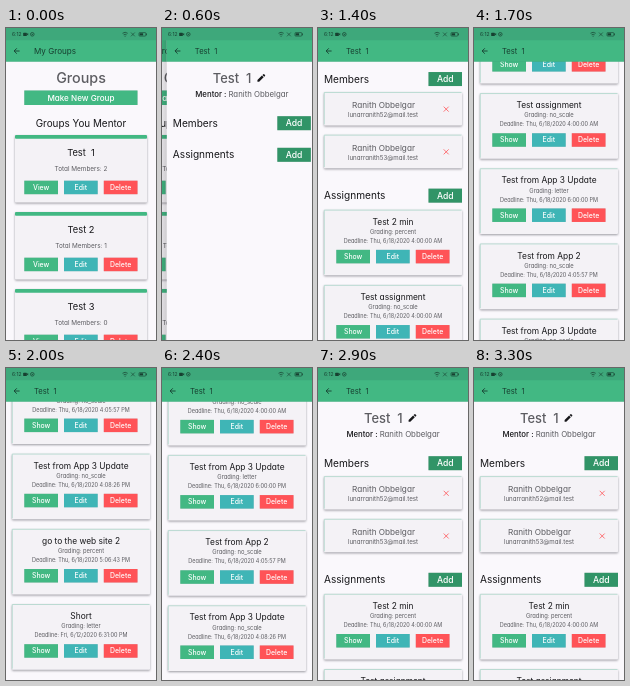
An HTML page for the animation above (3.6 s loop, 150 by 312 pixels).

```html
<!DOCTYPE html>
<html lang="en">
<head>
<meta charset="utf-8">
<title>Groups</title>
<style>
  html, body { margin: 0; width: 100%; height: 100%; overflow: hidden; background: #faf8fc; }
  svg { display: block; width: 100vw; height: 100vh; }
  text {
    font-family: Inter, "Open Sans", sans-serif;
    font-feature-settings: "cv11";
    white-space: pre;
  }
  .card { filter: drop-shadow(0 1px 1px rgba(40, 40, 50, .45)); }
  .btn { filter: drop-shadow(0 .4px .5px rgba(40, 40, 50, .2)); }
</style>
</head>
<body>
<svg id="stage" viewBox="0 0 150 312" preserveAspectRatio="none">
  <defs>
    <linearGradient id="edge">
      <stop offset="0" stop-opacity="0"/>
      <stop offset="1" stop-opacity=".16"/>
    </linearGradient>
  </defs>
</svg>
<script>
const LOOP = 3600, STEP = 100, W = 150, H = 312;
const GREEN = '#42b883', DEEP = '#319467', TEAL = '#3fb5b6', RED = '#ff5357';
const BG = '#faf8fc', CARD = '#f4f2f6', INK = '#17171a', GREY = '#5c5c61', BAR_INK = '#173f30';
const PERSON = 'Ranith Obbelgar';
const NB = '\u00a0';
const TITLE = 'Test' + NB + NB + '1';

const rect = (x, y, w, h, fill, more = '') =>
  `<rect x="${x}" y="${y}" width="${w}" height="${h}" fill="${fill}" ${more}/>`;

const text = (str, x, y, size, fill, weight = 400, anchor = 'middle') =>
  `<text x="${x}" y="${y}" font-size="${size}" fill="${fill}" font-weight="${weight}" text-anchor="${anchor}">${str}</text>`;

const line = (d, color, width) =>
  `<path d="${d}" fill="none" stroke="${color}" stroke-width="${width}"/>`;

const group = (id, body) => `<g id="${id}">${body}</g>`;

const button = (label, x, y, w, h, fill, size) =>
  rect(x, y, w, h, fill, 'class="btn"') +
  text(label, x + w / 2, y + h / 2 + size * .36, size, '#fff', 500);

const actions = (first, y) =>
  button(first, 18.3, y, 33.7, 13.5, GREEN, 6.9) +
  button('Edit', 58, y, 33.7, 13.5, TEAL, 6.9) +
  button('Delete', 97.8, y, 33.7, 13.5, RED, 6.9);

const appBar = (title, size) =>
  rect(0, 0, W, 33.7, GREEN, 'class="btn"') +
  line('M13.6 23H8.2M10.8 20.3L8.1 23L10.8 25.7', BAR_INK, .9) +
  text(title, 28, 26, size, BAR_INK, 400, 'start');

function groupCard(name, count, i) {
  const y = 107 + i * 77;
  return rect(9, y, 132, 67.5, CARD, 'rx="1" class="card"') +
    rect(9, y, 132, 3.8, GREEN, 'rx="1"') +
    text(name, 75, y + 21, 9.3, INK) +
    text('Total Members: ' + count, 75, y + 36, 6.4, GREY) +
    actions('View', y + 45.7);
}

function panel(y, h) {
  return rect(6, y, 138, h, CARD, 'rx="1" class="card"') +
    line(`M6.3 ${y + h - 1}V${y + .3}H143.5`, '#aed6cb', .8);
}

function member(email, i) {
  const y = 108.3 + i * 42.7;
  return panel(y, 33.3) +
    text(PERSON, 65.5, y + 15.7, 8.2, GREY) +
    text(email, 65, y + 25, 6.2, GREY) +
    line(`M125.7 ${y + 14.5}l5 5m0 -5l-5 5`, RED, .8);
}

function task([name, grading, due], i) {
  const y = 226 + i * 75.2;
  return panel(y, 65.5) +
    text(name, 75, y + 15, 8.4, INK) +
    text('Grading: ' + grading, 75, y + 24.2, 5.8, GREY) +
    text('Deadline: ' + due, 75, y + 33.2, 5.5, GREY) +
    actions('Show', y + 40);
}

const section = (label, y) =>
  text(label, 6, y, 10.1, INK, 400, 'start') +
  button('Add', 110.5, y - 10.5, 33.5, 14, DEEP, 8.6);

const tasks = [
  ['Test 2 min', 'percent', 'Thu, 6/18/2020 4:00:00 AM'],
  ['Test assignment', 'no_scale', 'Thu, 6/18/2020 4:00:00 AM'],
  ['Test from App 3 Update', 'letter', 'Thu, 6/18/2020 6:00:00 PM'],
  ['Test from App 2', 'no_scale', 'Thu, 6/18/2020 4:05:57 PM'],
  ['Test from App 3 Update', 'no_scale', 'Thu, 6/18/2020 4:08:26 PM'],
  ['go to the web site 2', 'percent', 'Thu, 6/18/2020 5:06:43 PM'],
  ['Short', 'letter', 'Fri, 6/12/2020 6:31:00 PM']
];

const listPage =
  rect(0, 0, W, H, BG) +
  text('Groups', 75, 55, 14.3, GREY, 500) +
  button('Make New Group', 18.3, 62.5, 113.2, 14.5, GREEN, 8.1) +
  text('Groups You Mentor', 75, 98.7, 9.9, INK) +
  groupCard(TITLE, 2, 0) + groupCard('Test 2', 1, 1) + groupCard('Test 3', 0, 2) +
  appBar('My Groups', 8.1);

const pencil =
  '<path d="M90.6 53.8v-1.7l4.5-4.5l1.7 1.7l-4.5 4.5zM95.6 47.1l.9-.9q.4-.3.8 0l.9.9q.3.4 0 .8l-.9.9z" fill="#17171a"/>';

const detailPage =
  rect(0, 0, W, H, BG) +
  group('scroll',
    text(TITLE, 46, 55, 12.9, GREY, 500, 'start') + pencil +
    `<text x="75" y="69" font-size="7.8" text-anchor="middle" fill="${GREY}">` +
    `<tspan font-weight="500" fill="${INK}">Mentor : </tspan>${PERSON}</text>` +
    section('Members', 98.7) +
    group('members', member('lunarranith52@mail.test', 0) + member('lunarranith53@mail.test', 1)) +
    group('work', section('Assignments', 215.3)) +
    group('tasks', tasks.map(task).join(''))) +
  appBar(TITLE, 7.6);

const statusBar =
  rect(0, 0, W, 12.3, '#3ea87b') +
  text('6:12', 6, 8.2, 5, BAR_INK, 400, 'start') +
  rect(17.2, 4.7, 3.6, 3.2, BAR_INK, 'rx=".5"') +
  `<path d="M20.6 6.3l1.6-1.3v2.6z" fill="${BAR_INK}"/>` +
  `<circle cx="26.3" cy="6.3" r="1.8" fill="none" stroke="${BAR_INK}" stroke-width=".7"/>` +
  `<circle cx="26.3" cy="6.3" r=".6" fill="${BAR_INK}"/>` +
  line('M116.5 5.3q2.6-2.1 5.2 0M117.6 6.8q1.5-1.2 3 0M118.5 8.2h1.2', BAR_INK, .7) +
  line('M125 4.5l3.8 3.8M125 8.3l3.8-3.8', BAR_INK, .6) +
  rect(133, 4.6, 6.8, 3.5, 'none', `rx=".7" stroke="${BAR_INK}" stroke-width=".6"`) +
  rect(133.7, 5.3, 3.4, 2.1, BAR_INK) + rect(140.1, 5.5, .7, 1.7, BAR_INK);

const stage = document.getElementById('stage');
stage.insertAdjacentHTML('beforeend',
  group('list', listPage) +
  group('detail', rect(-10, 0, 10, H, 'url(#edge)') + detailPage) +
  statusBar);

const $ = id => document.getElementById(id);
const [list, detail, scroll, members, work, taskList] =
  ['list', 'detail', 'scroll', 'members', 'work', 'tasks'].map($);

const move = (el, x, y) => el.setAttribute('transform', `translate(${x} ${y})`);
const show = (el, on) => el.setAttribute('visibility', on ? 'visible' : 'hidden');
const progress = (t, from, to) => Math.min(1, Math.max(0, (t - from) / (to - from)));

// Page push: cubic Bezier with controls (.35, .91) and (.33, .97)
function slideAt(t) {
  const u = progress(t, 340, 740);
  const axis = (s, a, b) => 3 * (1 - s) ** 2 * s * a + 3 * (1 - s) * s * s * b + s ** 3;
  let lo = 0, hi = 1;
  for (let i = 0; i < 20; i++) {
    const mid = (lo + hi) / 2;
    if (axis(mid, .35, .33) < u) lo = mid; else hi = mid;
  }
  return u === 0 ? 0 : u === 1 ? 1 : axis(lo, .91, .97);
}

// A finger gathers speed, then the list runs evenly until it meets its end.
function fling(t, from, to) {
  const u = progress(t, from, to), ramp = .387, speed = 1 / (1 - ramp / 2);
  return u < ramp ? speed * u * u / (2 * ramp) : 1 - speed * (1 - u);
}

const scrollAt = t => 441 * (fling(t, 1200, 2000) - fling(t, 2060, 2782));

function draw(now) {
  const t = Math.floor(now % LOOP / STEP) * STEP;
  const p = slideAt(t);
  const loaded = t >= 800;
  move(list, -W / 3 * p, 0);
  move(detail, W * (1 - p), 0);
  show(detail, p > 0);
  move(scroll, 0, -scrollAt(t));
  show(members, p > 0 && loaded);
  show(taskList, p > 0 && t >= 900);
  move(work, 0, loaded ? 0 : -85);
}

const start = performance.now();
function tick() {
  draw(performance.now() - start);
  requestAnimationFrame(tick);
}
tick();
</script>
</body>
</html>
```
